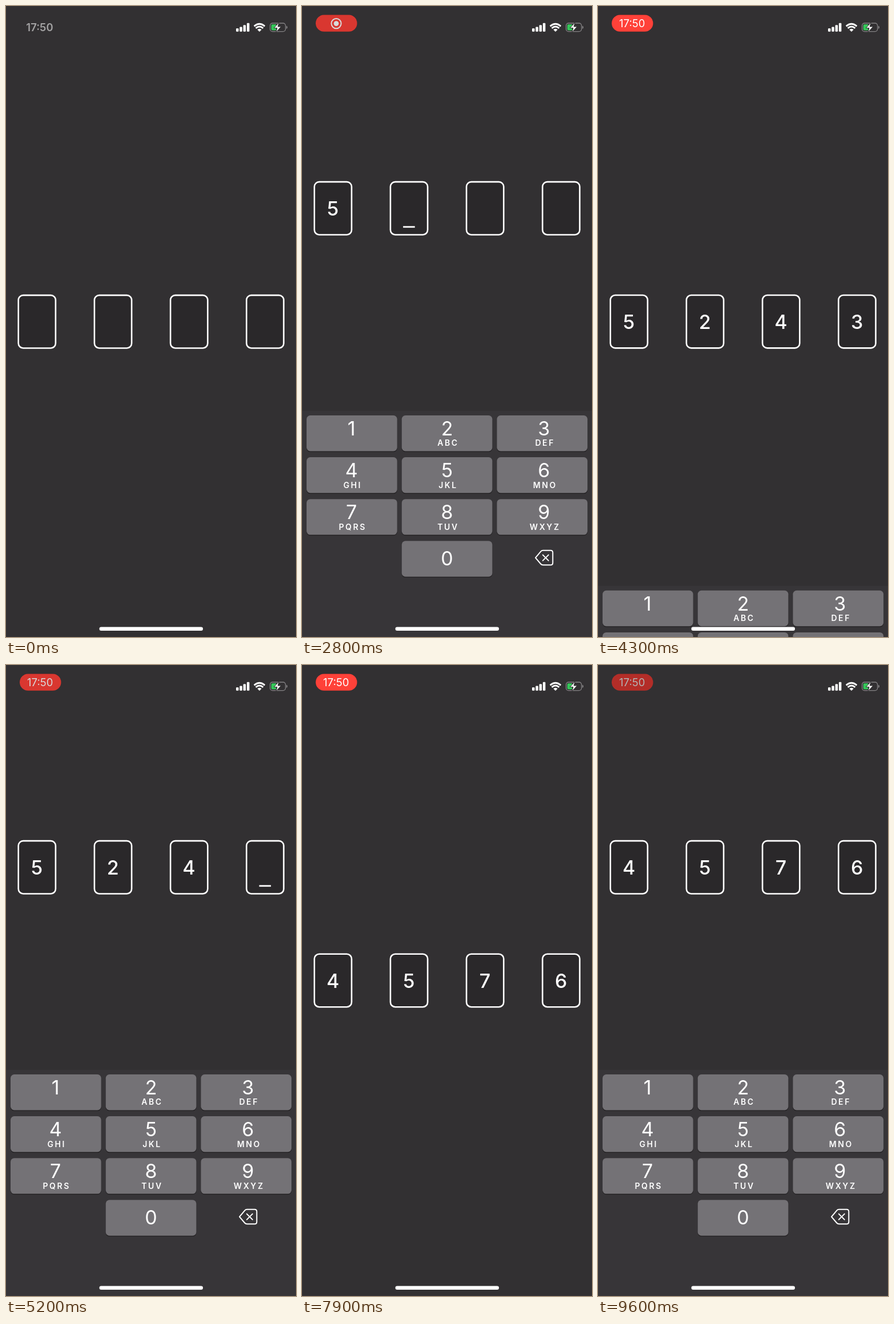
An HTML page for the animation above (9.7 s loop, 508 px wide and 1102 px high).

```html
<!DOCTYPE html>
<html lang="en">
<head>
<meta charset="utf-8">
<title>Code entry</title>
<style>
  html, body { margin: 0; width: 100%; height: 100%; overflow: hidden; background: #323032; }
  svg { display: block; width: 100%; height: 100%; font-family: Inter, Roboto, sans-serif; }
  text { fill: #fff; text-anchor: middle; }
  .clock { font-size: 18.5px; }
  .digit { font-size: 34px; font-weight: 400; }
  .letters { font-size: 14px; font-weight: 600; letter-spacing: 2.6px; }
  .code { font-size: 34px; font-weight: 500; }
  .cell { fill: #2a282a; stroke: #fff; stroke-width: 2.6; }
  .line { fill: none; stroke: #fff; stroke-width: 2; stroke-linecap: round; stroke-linejoin: round; }
</style>
</head>
<body>
<svg viewBox="0 0 508 1102">
  <rect width="508" height="1102" fill="#323032"/>

  <text id="plainClock" class="clock" x="59" y="43.7" font-weight="600" style="fill:#a3a2a3">17:50</text>
  <g id="pill">
    <rect x="24.3" y="15.8" width="71.9" height="28.7" rx="14.3"/>
    <g id="glow">
      <rect x="24" y="15.5" width="72.5" height="29.3" rx="14.6" fill="#ff4139"/>
      <g id="recording">
        <circle cx="60" cy="30.6" r="8.6" class="line"/>
        <circle cx="60" cy="30.6" r="4.4" fill="#fff"/>
      </g>
      <text id="pillClock" class="clock" x="59.7" y="37">17:50</text>
    </g>
  </g>

  <g fill="#fff">
    <rect x="403" y="39" width="4.5" height="5.7" rx="1.2"/>
    <rect x="409.3" y="36.6" width="4.5" height="8.1" rx="1.2"/>
    <rect x="415.6" y="33.2" width="4.5" height="11.5" rx="1.2"/>
    <rect x="421.9" y="29.8" width="4.5" height="14.9" rx="1.2"/>
    <path d="M444 45 L440.3 41.2 Q444 38.2 447.7 41.2 Z"/>
  </g>
  <g fill="none" stroke="#fff" stroke-width="2.9">
    <path d="M437.6 38.8 Q444 33.4 450.4 38.8"/>
    <path d="M434.7 35.3 Q444 27.2 453.3 35.3"/>
  </g>
  <rect x="462.6" y="30" width="27" height="14.6" rx="4.3" fill="none" stroke="#858385" stroke-width="1.3"/>
  <path d="M491 34.5 q2 .8 2 2.8 t-2 2.8 z" fill="#858385"/>
  <path d="M467 32 H473 V42.6 H467 Q464.6 42.6 464.6 40.2 V34.4 Q464.6 32 467 32 Z" fill="#35c759"/>
  <path d="M478.3 28.8 L469.3 38.4 H475 L472.8 46 L482 36 H476.2 Z" fill="#fff" stroke="#323032" stroke-width="1"/>

  <g id="cells"></g>
  <g id="keyboard">
    <rect width="508" height="420" fill="#373538"/>
    <g id="keys"></g>
    <g class="line" transform="translate(0 -707)">
      <path id="erase" d="M409 963.6 L418.3 952.6 Q419.8 950.8 422.3 950.8 H435.5 Q439.3 950.8 439.3 954.6 V972.4 Q439.3 976.2 435.5 976.2 H422.3 Q419.8 976.2 418.3 974.5 Z"/>
      <path id="eraseCross" d="M421.8 958.6 l10 10 m0 -10 l-10 10"/>
    </g>
  </g>
  <rect x="163.5" y="1084.5" width="181.5" height="6.5" rx="3.25" fill="#fff"/>
</svg>
<script>
const LOOP = 9700, STEP = 100;
const KEYBOARD_HEIGHT = 395, CELL_LIFT = 198, CELL_LAG = 48;
const ERASE = '<';

// Keyboard transitions: start time and direction.
const slides = [[846, 1], [3720, -1], [4251, 1], [7420, -1], [8553, 1]];

// Key held for one step, its effect follows on release.
const presses = [
  [2500, '5'], [3000, '2'], [3300, '4'], [3600, '3'],
  [5100, ERASE], [5400, ERASE], [5600, ERASE], [5800, ERASE],
  [6500, '4'], [6900, '5'], [7100, '7'], [7300, '6']
];

const PILL_START = 100, PILL_CLOCK_START = 3900, PULSE = 3600;
const pulsePeaks = { recording: 100, clock: 4300 };

const $ = id => document.getElementById(id);
const show = (node, visible) => node.setAttribute('visibility', visible ? 'inherit' : 'hidden');
const moveY = (node, y) => node.setAttribute('transform', `translate(0 ${y.toFixed(2)})`);

function buildKeys() {
  const letters = ['', 'ABC', 'DEF', 'GHI', 'JKL', 'MNO', 'PQRS', 'TUV', 'WXYZ'];
  const centers = [86.7, 254, 423.7];
  const key = (name, col, row, label) => {
    const x = 8 + 166.7 * col, y = 8 + 73.1 * row;
    const baseline = y + (label === null ? 42.3 : 35);
    return `<rect x="${x}" y="${y + 1.4}" width="158.7" height="62.4" rx="6.5" fill="#222022"/>
      <rect id="key${name}" x="${x}" y="${y}" width="158.7" height="62.4" rx="6.5"/>
      <text class="digit" x="${centers[col]}" y="${baseline}">${name}</text>
      <text class="letters" x="${centers[col] + 2}" y="${y + 53.4}">${label || ''}</text>`;
  };
  $('keys').innerHTML =
    letters.map((label, i) => key(i + 1, i % 3, Math.floor(i / 3), label)).join('') + key(0, 1, 3, null);
}

function buildCells() {
  $('cells').innerHTML = [0, 1, 2, 3].map(i => {
    const x = 21.7 + 133.2 * i;
    return `<rect class="cell" x="${x}" y="505.1" width="65.2" height="92.4" rx="8.5"/>
      <text class="code" id="code${i}" x="${x + 32.4}" y="564.2"></text>
      <rect id="cursor${i}" x="${x + 22.2}" y="582.4" width="20.6" height="2.8" fill="#fff"/>`;
  }).join('');
}

// Critically damped spring from 0 to 1.
function spring(ms) {
  const u = Math.max(0, ms) * 0.01826;
  return 1 - (1 + u) * Math.exp(-u);
}

function raised(time, showLag = 0) {
  return slides.reduce((sum, [start, dir]) =>
    sum + dir * spring(time - start - (dir > 0 ? showLag : 0)), 0);
}

function codeAt(time) {
  return presses.filter(([down]) => time >= down + STEP)
    .reduce((code, [, key]) => key === ERASE ? code.slice(0, -1) : code + key, '');
}

function drawPill(time) {
  const clock = time >= PILL_CLOCK_START;
  const peak = clock ? pulsePeaks.clock : pulsePeaks.recording;
  const active = time >= PILL_START;
  show($('plainClock'), !active);
  show($('pill'), active);
  show($('recording'), !clock);
  show($('pillClock'), clock);
  $('glow').setAttribute('opacity', 0.85 + 0.15 * Math.cos(2 * Math.PI * (time - peak) / PULSE));
}

function drawKeyboard(time) {
  moveY($('keyboard'), 1102 - KEYBOARD_HEIGHT * raised(time));
  const press = presses.find(([down]) => time >= down && time < down + STEP);
  const held = press ? press[1] : null;
  for (let n = 0; n < 10; n++) {
    $('key' + n).setAttribute('fill', held === String(n) ? '#4f4d50' : '#747276');
  }
  $('erase').setAttribute('fill', held === ERASE ? '#fff' : 'none');
  $('eraseCross').setAttribute('stroke', held === ERASE ? '#373538' : '#fff');
}

function drawCells(time) {
  moveY($('cells'), -CELL_LIFT * raised(time, CELL_LAG));
  const code = codeAt(time);
  const last = slides.filter(([start]) => time >= start).pop();
  const focused = last && last[1] > 0;
  for (let i = 0; i < 4; i++) {
    $('code' + i).textContent = code[i] || '';
    show($('cursor' + i), focused && i === code.length);
  }
}

function draw(time) {
  drawPill(time);
  drawKeyboard(time);
  drawCells(time);
}

buildKeys();
buildCells();
draw(0);

const origin = performance.now();
function tick() {
  const elapsed = (performance.now() - origin) % LOOP;
  draw(Math.floor(elapsed / STEP) * STEP);
  requestAnimationFrame(tick);
}
requestAnimationFrame(tick);
</script>
</body>
</html>
```
